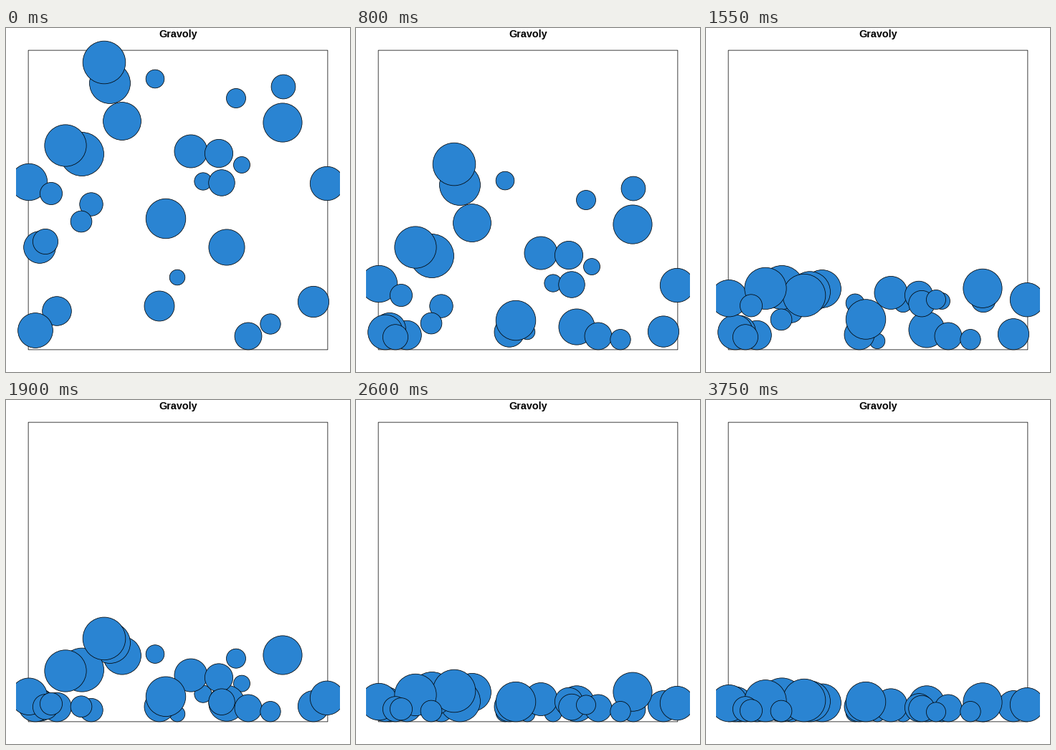
Write a matplotlib script that moves like this. It is 480 by 480 pixels and loops after 5.05 s.

```python
import matplotlib.pyplot as plt
import numpy as np
from matplotlib.animation import FuncAnimation
from matplotlib.patches import Circle, Rectangle

SIZE, DPI = 480, 72
FRAMES, INTERVAL = 101, 50
MARGIN = 14.4                        # edge of the clipped plot region
PLOT = SIZE - 2 * MARGIN
SIDE = PLOT / 1.08                   # the box leaves 4 % of itself on each side
LEFT = (SIZE - SIDE) / 2
FLOOR = LEFT + SIDE
GRAVITY = SIDE / 400                 # pixels per frame squared
RESTITUTION = 0.5
BLUE = "#2a84d2"
LINE = dict(ec="black", lw=0.75)

# Starting points, from the smallest ball to the largest
STARTS = [
    (239, 348), (329, 191), (275, 214), (208, 71), (321, 98),
    (369, 413), (105, 270), (63, 231), (119, 246), (387, 82),
    (55, 298), (301, 216), (338, 431), (297, 175), (71, 395),
    (214, 388), (429, 382), (47, 306), (258, 172), (448, 217),
    (41, 422), (308, 306), (32, 215), (162, 130), (386, 132),
    (223, 266), (145, 77), (83, 164), (137, 48), (106, 176),
]
RADII = np.linspace(10.8, 30.5, len(STARTS))
FRONT = [*range(4, 8), *range(10, 14), *range(27, 30)]


def depth(rank):
    """Back balls stack small to large, front balls large to small."""
    return 2 * len(STARTS) - rank if rank in FRONT else rank


def bounce_path(y, radius):
    """Centre height of a ball in every frame."""
    rest = FLOOR - radius
    height, speed = max(0, (rest - y) / GRAVITY), 0.0
    path = []
    for _ in range(FRAMES):
        path.append(rest - height * GRAVITY)
        speed += 1
        height -= speed
        if height < 0:
            height, speed = 0.0, -RESTITUTION * speed
    return path


fig = plt.figure(figsize=(SIZE / DPI, SIZE / DPI), dpi=DPI, facecolor="white")
ax = fig.add_axes([0, 0, 1, 1])
ax.set(xlim=(0, SIZE), ylim=(SIZE, 0))
ax.axis("off")

ax.text(SIZE / 2, 13.2, "Gravoly", ha="center", va="baseline",
        family="Liberation Sans", weight="bold", size=14.4)
ax.add_patch(Rectangle((LEFT, LEFT), SIDE, SIDE, fill=False, snap=False, **LINE))
clip = Rectangle((MARGIN, MARGIN), PLOT, PLOT, transform=ax.transData)

circles, paths = [], []
for rank, ((x, y), radius) in enumerate(zip(STARTS, RADII)):
    circle = Circle((x, y), radius, fc=BLUE, zorder=5 + depth(rank), **LINE)
    ax.add_patch(circle)
    circle.set_clip_path(clip)
    circles.append(circle)
    paths.append(bounce_path(y, radius))


def update(frame):
    for circle, path, (x, _) in zip(circles, paths, STARTS):
        circle.center = x, path[frame]
    return circles


anim = FuncAnimation(fig, update, frames=FRAMES, interval=INTERVAL,
                     repeat=True, repeat_delay=0)
plt.show()
```
